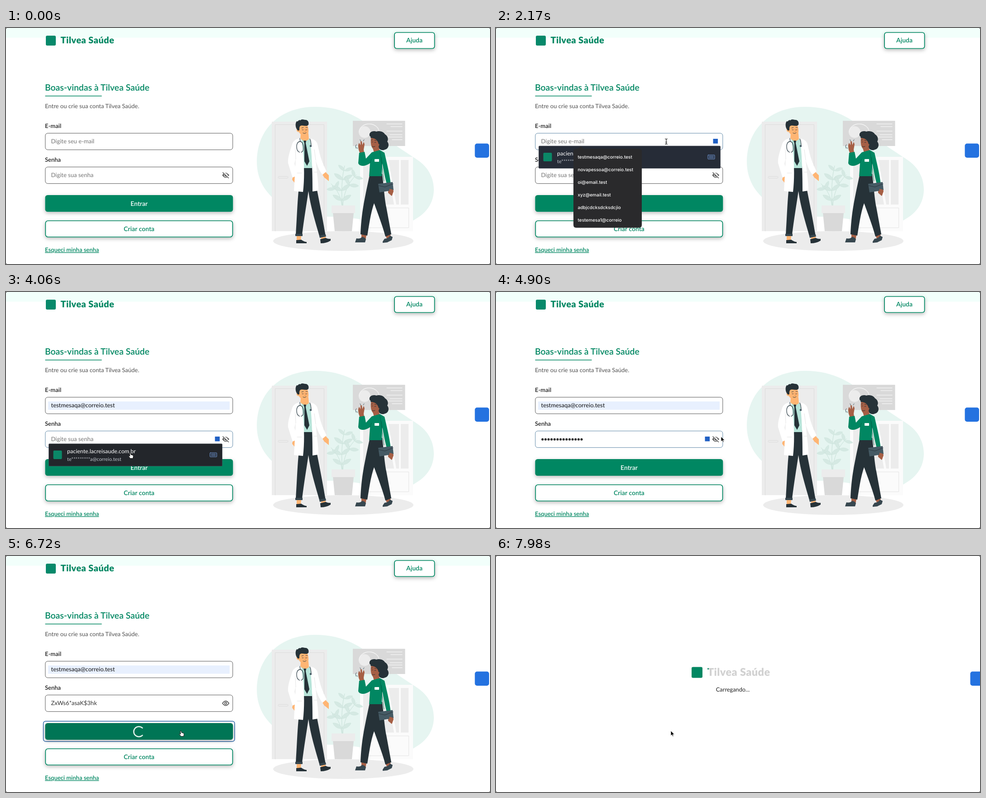
Recreate the animation shown at these times as an HTML page. Size 1069 px wide and 524 px high, loop 8 s.

```html
<!DOCTYPE html>
<html lang="pt-BR">
<head>
<meta charset="utf-8">
<title>Entrar</title>
<style>
  html, body { margin: 0; width: 100%; height: 100%; overflow: hidden; background: #fff; }
  svg { display: block; width: 100vw; height: 100vh; }
  text { font: 13px Lato, "Open Sans", sans-serif; text-rendering: geometricPrecision; }
  .brand { font-weight: 900; letter-spacing: .4px; }
  .semi { font-weight: 600; }
  .button { font-size: 14px; font-weight: 600; text-anchor: middle; }
  .hint { fill: #757575; }
  .vault text { font-family: "Open Sans", "Noto Sans", sans-serif; }
  .list text { font: 500 10px Inter, sans-serif; fill: #fff; }
  .line { fill: none; stroke-linecap: round; stroke-linejoin: round; }
</style>
</head>
<body>
<svg viewBox="0 0 1069 524" preserveAspectRatio="none">
  <defs>
    <filter id="shadow" x="-20%" y="-60%" width="140%" height="240%">
      <feDropShadow dx="0" dy="3" stdDeviation="4.2" flood-color="#000" flood-opacity=".28"/>
    </filter>
    <clipPath id="sweep"><rect id="sweepBox" x="429" y="240" width="0" height="40"/></clipPath>
    <g id="loadingBrand">
      <rect x="432" y="246.500" width="24" height="24" rx="3"/>
      <text class="brand" x="467" y="265.500" style="font-size:23.5px">Tilvea Saúde</text>
    </g>
    <g id="leafPair">
      <path d="M0 0C-3-9-12-13-20-12C-17-4-9 1 0 0ZM0 0C3-9 12-13 20-12C17-4 9 1 0 0Z"/>
    </g>
    <g id="vaultText">
      <rect x="104.500" y="15" width="19" height="19" rx="2" fill="#0b8767"/>
      <text x="135" y="21" fill="#fff" style="font-size:12.5px">paciente.lacreisaude.com.br</text>
      <text x="135" y="38" fill="#c3c7ce" style="font-size:10.9px">te*********a@correio.test</text>
    </g>
    <g id="card" class="line" stroke="#729bdc">
      <rect x=".5" y=".5" width="15" height="9" rx="1"/>
      <path d="M3 3h10M3 5h10M3 7h10" stroke-width=".8"/>
    </g>
  </defs>

  <rect width="1069" height="524" fill="#fff"/>

  <g id="login">
    <rect width="1069" height="21.500" fill="#f2fffb"/>
    <rect x="88" y="17" width="22" height="22" rx="3" fill="#07896a"/>
    <text class="brand" x="120.500" y="34" fill="#018762" style="font-size:20px">Tilvea Saúde</text>

    <rect x="858" y="10" width="88.500" height="35.500" rx="5" fill="#fff" stroke="#018762" stroke-width="1.700" filter="url(#shadow)"/>
    <text class="button" x="902" y="32" fill="#018762">Ajuda</text>

    <text class="semi" x="86" y="139" fill="#018762" style="font-size:19.4px">Boas-vindas à Tilvea Saúde</text>
    <path d="M86.500 151H211.500" stroke="#018762" stroke-width="1.600"/>
    <text x="86" y="178" fill="#515151">Entre ou crie sua conta Tilvea Saúde.</text>

    <text class="semi" x="86" y="221.500" fill="#1f1f1f">E-mail</text>
    <rect id="emailBox" x="86.800" y="233.600" width="414" height="36.800" rx="5.500" fill="#fff"/>
    <text id="emailHint" class="hint" x="99.500" y="256">Digite seu e-mail</text>
    <g id="emailValue">
      <rect x="93" y="243" width="401" height="18.500" fill="#e8f0fe"/>
      <text x="99.500" y="256" fill="#111">testmesaqa@correio.test</text>
    </g>
    <rect id="emailBadge" x="479.500" y="246" width="10.500" height="10.500" fill="#2160c4"/>

    <text class="semi" x="86" y="296.500" fill="#1f1f1f">Senha</text>
    <rect id="passBox" x="86.800" y="308.600" width="414" height="36.800" rx="5.500" fill="#fff"/>
    <text id="passHint" class="hint" x="99.500" y="331">Digite sua senha</text>
    <path id="passDots" d="M102.800 327.300H190" class="line" stroke="#111" stroke-width="5" stroke-dasharray="0 6.630"/>
    <text id="passValue" x="99.500" y="331" fill="#333">ZxWs6*asaK$3hk</text>
    <rect id="passBadge" x="461.500" y="321" width="10.500" height="10.500" fill="#2160c4"/>
    <g id="eyeOff">
      <path d="M477.500 327Q485.300 316 493 327Q485.300 338 477.500 327Z" fill="#5b5b5b"/>
      <circle cx="485.300" cy="327" r="3.300" fill="#5b5b5b" stroke="#fff" stroke-width="1.300"/>
      <path d="M479.500 319.500L493 333" stroke="#fff" stroke-width="3.600"/>
      <path d="M478.500 320.500L492 333.500" stroke="#5b5b5b" stroke-width="1.700"/>
    </g>
    <g id="eyeOn" fill="none" stroke="#454545" stroke-width="1.400">
      <path d="M478.200 327Q485.300 317 492.400 327Q485.300 337 478.200 327Z"/>
      <circle cx="485.300" cy="327" r="2.300"/>
    </g>

    <rect id="ring" x="82.500" y="366.800" width="422.500" height="45" rx="5" fill="#fff" stroke="#2c66a9" stroke-width="1.500"/>
    <rect id="enter" x="86.500" y="371" width="414.800" height="37" rx="5.500" filter="url(#shadow)"/>
    <text id="enterLabel" class="button" x="294" y="394.500" fill="#fff">Entrar</text>
    <path id="spinner" class="line" d="M301.300 381.900A11.300 11.300 0 1 0 301.300 398.100" stroke="#e6f3ee" stroke-width="2.500"/>
    <rect x="87.300" y="428" width="413.200" height="36" rx="5.500" fill="#fff" stroke="#018762" stroke-width="1.700" filter="url(#shadow)"/>
    <text class="button" x="294" y="450.500" fill="#018762">Criar conta</text>
    <text class="semi" x="86" y="497" fill="#018762" text-decoration="underline">Esqueci minha senha</text>

    <g id="scenery">
      <path fill="#e6f5f1" d="M554 297C554 220 611 175 682 175C748 175 785 202 822 232C855 258 882 275 909 293C934 310 945 334 945 360C944 396 921 416 898 428C850 446 782 417 716 419C625 419 554 373 554 297Z"/>
      <ellipse cx="745" cy="473" rx="155" ry="22" fill="#ececec"/>
      <path fill="#ececec" d="M587 208H709V451H587Z"/>
      <path class="line" stroke="#dcdcdc" d="M594.500 451V214.500H702.500V451M603 329.500h18a2 2 0 0 1 0 4h-18a2 2 0 0 1 0-4Z"/>
      <rect x="766" y="206" width="115.500" height="56" fill="#d9d9d9"/>
      <circle cx="792" cy="231" r="13" fill="#ececec"/>
      <path class="line" stroke="#f4f4f4" stroke-width="1.300" d="M780 231A22 18 0 0 1 824 231M841 213h34M850 219h25M841 229h34M848 237h27M843 242h32M853 248h22"/>
      <rect x="782" y="286" width="117" height="165" fill="#fbfbfb"/>
      <path fill="#ececec" d="M789 293h100v99h-100Z"/>
      <path fill="#fbfbfb" d="M868 293h4v99h-4ZM839 293h6l17 99h-5Z"/>
      <path fill="none" stroke="#e4e4e4" d="M789.500 399.500h100v44h-100Z"/>

      <g class="line" stroke="#c6dfd7" stroke-width="1">
        <path d="M743 394C740 360 742 330 748 306M744 394C746 363 758 341 774 326M742 394C740 374 730 356 718 346"/>
      </g>
      <g fill="#d5e9e3" stroke="#c9e1d9" stroke-width=".6">
        <use href="#leafPair" transform="translate(742 383)"/>
        <use href="#leafPair" transform="translate(741 361) rotate(-5)"/>
        <use href="#leafPair" transform="translate(744 337) rotate(5)"/>
        <use href="#leafPair" transform="translate(748 317) rotate(12) scale(.8)"/>
        <use href="#leafPair" transform="translate(758 349) rotate(35) scale(.9)"/>
        <use href="#leafPair" transform="translate(770 331) rotate(42) scale(.8)"/>
        <use href="#leafPair" transform="translate(727 357) rotate(-35) scale(.8)"/>
      </g>
      <path fill="#d9d9d9" d="M722 410H768L764 451H726Z"/>
      <path fill="#ececec" d="M719 394H771V411H719Z"/>

      <!-- doctor -->
      <path fill="#ffb573" d="M642 462h10l-1 11h-9ZM695 462l10-2 2 10-10 3Z"/>
      <path fill="#263238" d="M641 471L652 470Q659 475 664 475V478H641ZM694 469L706 466Q712 469 717 468V472Q708 478 695 478Z"/>
      <path fill="#263238" d="M655 307H678C683 345 694 390 706 462L693 465C683 430 672 394 668 362C664 390 658 425 654 459H640C644 400 644 350 655 307Z"/>
      <path fill="#37474f" d="M639 457H655V462H639ZM692 461L706 458L707 463L693 466Z"/>
      <path fill="#ffb573" d="M634 327L646 337L648 343L640 347L632 337ZM698 324L706 320L713 327V340L707 335L703 332Z"/>
      <path fill="#b7e4d9" d="M652 246H675L676 311H654Z"/>
      <path fill="#ffb573" d="M651 234H668L669 247L661 252L650 246Z"/>
      <path fill="#263238" d="M657 250H663L662 256L670 296L665 306L659 296L659 256Z"/>
      <path fill="#fff" d="M650 244C641 247 635 249 632 258C627 274 622 288 623 300L633 332L644 327L637 301L640 290L636 362L656 364C660 330 659 285 652 248ZM669 244C679 247 685 249 688 258C692 276 695 293 708 318L699 326C691 315 687 305 684 293C686 318 690 340 690 361L677 363C677 325 676 283 672 250Z"/>
      <path class="line" stroke="#dedede" stroke-width=".8" d="M640 291L639 268M684 293L681 270M643 322h10M681 320h6"/>
      <path class="line" stroke="#37474f" stroke-width="1.300" d="M649 245L650 252M644 273C640 263 642 253 649 252C657 252 658 265 656 273L652 276M645 273L648 276M671 246C674 251 673 254 674 260"/>
      <circle cx="673" cy="262" r="2.300" fill="#455a64"/>
      <path fill="#ffb573" d="M645 216L665 214C670 226 669 237 663 240C655 241 649 235 647 231C641 231 640 224 645 223Z"/>
      <path fill="#263238" d="M645 228C639 223 638 212 642 207C646 209 645 203 650 205C654 201 658 204 662 204C666 204 670 209 668 215C664 220 657 215 651 217C648 218 648 222 648 227Z"/>
      <path class="line" stroke="#263238" stroke-width=".9" d="M653 222l4-1M662 221l4 0M654 226q2 1 3 0M662 226q2 1 3 0M656 233q5 3 7-1"/>
      <path class="line" stroke="#e88d4e" stroke-width=".8" d="M660 224l2 6-3 0"/>

      <!-- visitor -->
      <path class="line" stroke="#455a64" stroke-width="1" d="M784 252l-2-4M789 251l2-3M774 259l-2 3 1 5M776 268l-1-3"/>
      <path fill="#263238" d="M803 239C801 231 811 227 818 230C827 227 835 232 837 236C844 240 845 248 842 252C848 259 844 269 837 270C831 273 825 270 823 266L809 246Z"/>
      <path fill="#a65f45" d="M785 458L796 460L794 471H785ZM837 459L848 457L852 468L843 471Z"/>
      <path fill="#37474f" d="M774 467Q782 469 786 464Q792 464 795 469L793 476H771ZM836 468Q845 467 848 461L854 464L852 471L842 476L832 477V474Z"/>
      <path fill="#263238" d="M804 322L831 324C835 358 836 378 840 398L851 458L838 463C831 437 820 409 813 389C805 412 802 438 798 461L783 458C785 411 791 386 796 360Z"/>
      <path fill="#a65f45" d="M782 278C777 268 777 260 780 255L783 260L783 251L786 252L787 260L790 253L792 258L790 270L791 277ZM809 263L822 260L827 278L814 280ZM844 350L853 348L856 363L852 373L844 366Z"/>
      <path fill="#a65f45" d="M807 241C815 235 826 242 825 254C825 263 820 269 813 269C806 268 804 252 807 241Z"/>
      <path fill="#263238" d="M805 244C808 233 819 231 825 238L829 257L823 258C821 248 814 244 805 244Z"/>
      <path class="line" stroke="#263238" stroke-width=".9" d="M807 249l3-1M814 249l4 1M808 253h2M814 254h3M809 263q3 2 6 0"/>
      <path fill="#018762" d="M780 277L792 275L795 290L808 276L826 271L836 277C841 300 847 321 850 348L843 353C837 334 834 315 831 300L830 329H802L804 300C792 309 780 307 778 300Z"/>
      <path class="line" stroke="#00674b" stroke-width=".9" d="M831 302L829 287M804 300L807 291M826 274L835 340"/>
      <rect x="814" y="291" width="10" height="6" rx=".7" fill="#fff"/>
      <path fill="#455a64" d="M822 346L854 342L856 360L825 365Z"/>
      <path class="line" stroke="#263238" stroke-width=".9" d="M823 350L837 353L855 346"/>
      <path fill="#a65f45" d="M847 357L855 359L853 372L846 366Z"/>
    </g>

    <g id="vaultEmail" class="vault" transform="translate(0 262)">
      <rect x="94.500" y="0" width="401" height="49.500" rx="1.500" fill="#262c37" stroke="#444a55" stroke-width=".8"/>
      <use href="#vaultText"/>
      <use href="#card" x="467.500" y="19.500"/>
    </g>
    <g id="list" class="list">
      <path fill="#2a2a2c" d="M177 268H178Q182 268 187 262.500Q192 268 196 268H316Q322 268 322 274V437Q322 443.500 316 443.500H177Q171 443.500 171 437V274Q171 268 177 268Z"/>
      <g id="options"></g>
    </g>
    <g id="vaultPass" class="vault" transform="translate(0 337)">
      <rect x="94.500" y="0" width="383" height="49.500" rx="1.500" fill="#23262b" stroke="#444a55" stroke-width=".8"/>
      <use href="#vaultText"/>
      <use href="#card" x="450" y="19.500"/>
    </g>
  </g>

  <g id="loading">
    <use href="#loadingBrand" fill="#d1d1d1"/>
    <use href="#loadingBrand" fill="#018762" clip-path="url(#sweep)"/>
    <text x="523" y="301" text-anchor="middle" fill="#1f1f1f" style="font-size:12.8px">Carregando...</text>
  </g>

  <rect id="widget" x="1035.500" y="256.500" width="31.500" height="31.500" rx="5" fill="#2472e0"/>
  <path fill="#555" d="M0 0h2L0 2ZM1069 0v2l-2-2ZM0 524v-2l2 2ZM1069 524h-2l2-2Z"/>

  <g id="pointer">
    <g id="beam" class="line">
      <path d="M-2.500-6Q0-6 0-4Q0-6 2.500-6M0-4V4M-2.500 6Q0 6 0 4Q0 6 2.500 6M-1.500 1.500h3" stroke="#222" stroke-width="1.200"/>
    </g>
    <path id="arrow" d="M0 0V11.200L2.600 8.800L4.400 12.800L6.200 12L4.500 8.200H8Z" fill="#000" stroke="#fff" stroke-width=".9"/>
    <path id="hand" d="M-1 1Q0-.8 1.200 1L2 4.500Q3.200 3.600 4 5Q5.200 4.300 5.800 5.700Q7.300 5.400 7.200 7.200L6.500 12.500H.7L-2.800 8.300Q-3.500 6.600-1.500 6.800L-.2 7.800Z" fill="#fff" stroke="#111" stroke-width="1"/>
  </g>
</svg>
<script>
const LOOP = 8000, STEP = 70, LOADING_AT = 7490;
const $ = id => document.getElementById(id);
const show = (id, on) => $(id).style.display = on ? "" : "none";
const clamp = v => Math.max(0, Math.min(1, v));
const ease = v => v * v * (3 - 2 * v);

const options = ["testmesaqa@correio.test", "novapessoa@correio.test", "oi@email.test",
  "xyz@email.test", "adbjcdcksdcksdcjio", "testemesa1@correio"];
$("options").innerHTML = options.map((label, i) =>
  `<text x="180.500" y="${289.5 + i * 28.15}">${label}</text>`).join("");

// time, x, y, shape from that time on
const track = [
  [490, 389, 351, "arrow"], [630, 384, 316, "beam"], [700, 379, 290, "arrow"],
  [770, 375, 262, "beam"], [910, 374, 243, "beam"], [1120, 376, 252, "beam"],
  [2170, 376, 252, "beam"], [2310, 330, 270, "arrow"], [2590, 283, 287, "arrow"],
  [2940, 283, 287, "beam"], [3220, 286, 321, "beam"], [3430, 286, 326, "beam"],
  [3780, 286, 326, "beam"], [3920, 279, 345, "hand"], [4060, 274, 357, "hand"],
  [4340, 274, 357, "arrow"], [4620, 274, 357, "arrow"], [4900, 497, 321, "arrow"],
  [5040, 486, 323, "hand"], [5530, 486, 323, "hand"], [5670, 455, 348, "arrow"],
  [5810, 412, 378, "hand"], [6020, 386, 388, "hand"], [LOADING_AT, 386, 388, "arrow"]
];

function movePointer(t) {
  show("pointer", t >= track[0][0]);
  const next = track.findIndex(key => key[0] > t);
  const to = track[next < 0 ? track.length - 1 : next];
  const from = next < 0 ? to : track[Math.max(0, next - 1)];
  const p = ease(clamp((t - from[0]) / (to[0] - from[0] || 1)));
  const at = i => from[i] + (to[i] - from[i]) * p;
  $("pointer").setAttribute("transform", `translate(${at(1)} ${at(2)})`);
  for (const shape of ["beam", "arrow", "hand"]) show(shape, shape === from[3]);
}

function outline(id, focused) {
  $(id).setAttribute("stroke", focused ? "#6089a8" : "#585858");
}

function render(t) {
  const within = (a, b) => t >= a && t < b;
  const emailFocus = within(1610, 3430), passFocus = within(3430, 5110);
  const filled = t >= 2660, sent = t >= 6160, loading = t >= LOADING_AT;

  show("login", !loading);
  show("loading", loading);

  outline("emailBox", emailFocus);
  show("emailBadge", emailFocus);
  show("emailHint", !filled);
  show("emailValue", filled);
  show("vaultEmail", within(1750, 2660));
  show("list", within(1820, 2660));

  outline("passBox", passFocus);
  show("passBadge", passFocus);
  show("passHint", t < 4410);
  show("passDots", within(4410, 5110));
  show("passValue", t >= 5110);
  show("eyeOff", t < 5110);
  show("eyeOn", t >= 5110);
  show("vaultPass", within(3500, 4340));

  show("ring", sent);
  show("spinner", sent);
  show("enterLabel", !sent);
  $("enter").setAttribute("fill", t >= 5810 ? "#007554" : "#018762");
  $("spinner").setAttribute("transform", `rotate(${(t - 6720) * .36} 293.500 390)`);

  const since = Math.max(0, t - LOADING_AT);
  $("sweepBox").setAttribute("width", since * .083);
  $("widget").setAttribute("transform", `translate(${12 * ease(clamp(since / 280))} 0)`);
  movePointer(t);
}

const start = performance.now();
function tick(now) {
  const t = Math.max(0, now - start) % LOOP;
  render(Math.floor(t / STEP) * STEP);
  requestAnimationFrame(tick);
}
render(0);
requestAnimationFrame(tick);
</script>
</body>
</html>
```
